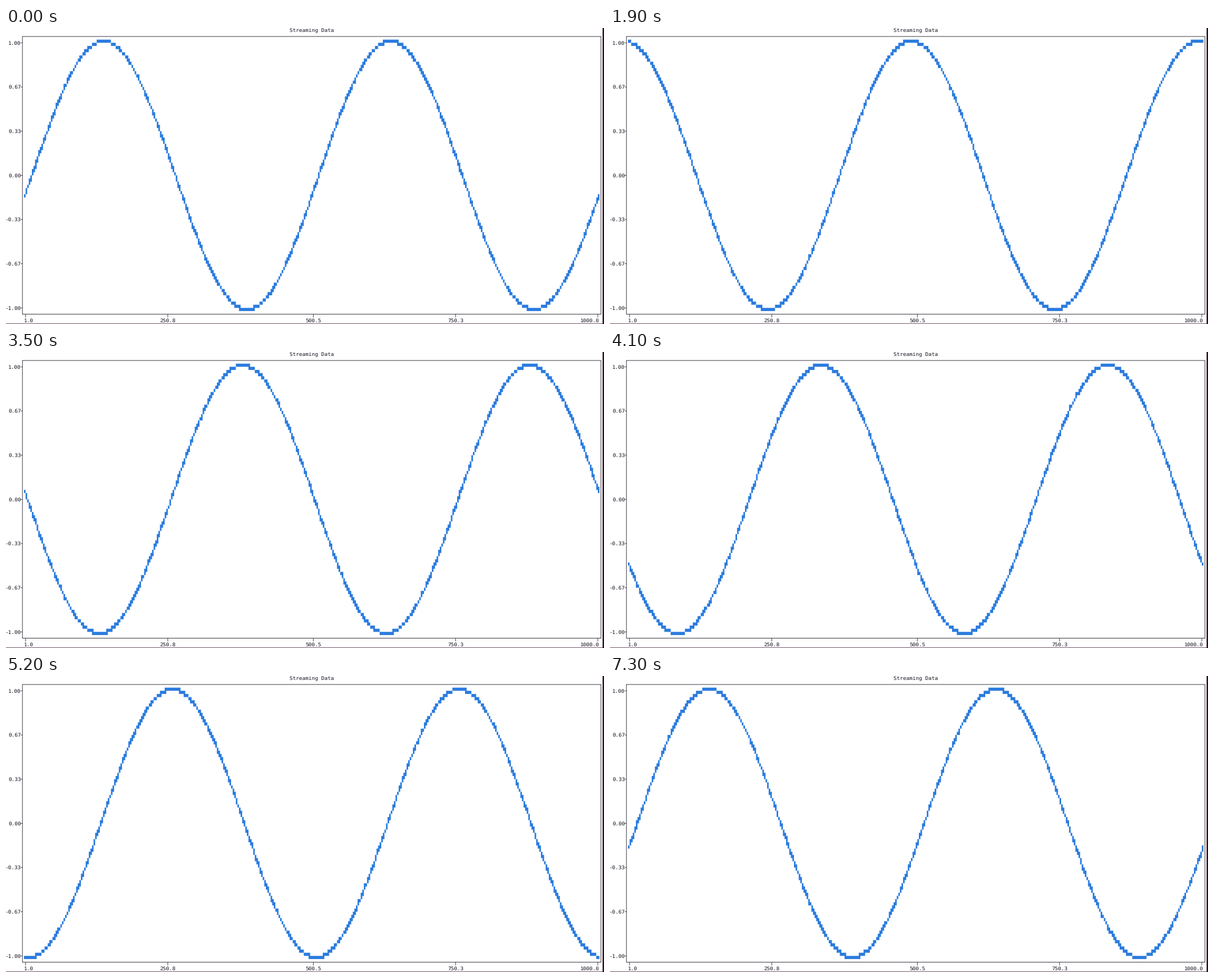
A matplotlib script that plays this animation: 1063 by 527 pixels, repeating every 7.4 s.

```python
import matplotlib.pyplot as plt
import numpy as np
from matplotlib.animation import FuncAnimation
from matplotlib.colors import LinearSegmentedColormap
from matplotlib.patches import Rectangle

plt.rcParams["text.hinting"] = "none"

W, H, DPI = 1063, 527, 128
PX = 72 / DPI                      # one pixel in points
INK, BLUE, EDGE = "#171421", "#2a7bde", "#300a24"

# Terminal character grid: each cell holds 2 x 2 plot dots
CELL_W, CELL_H = 5.62, 11.238
COLS, ROWS = 182, 43
LEFT, TOP = 32.0, 20.7
RIGHT, BOTTOM = LEFT + COLS * CELL_W, TOP + ROWS * CELL_H

POINTS, PHASE_STEPS = 1000, 200
FRAMES, INTERVAL = 74, 100
STALLED = [25, 54, 60, 67, 72]     # frames on which the stream pauses
UPDATE_COUNTS = [0, 10, 27, 40, 51, 60, 68]
PHASES = [-5, 25, 78, 116, 147, 172, 194]

fig = plt.figure(figsize=(W / DPI, H / DPI), dpi=DPI, facecolor="white")
ax = fig.add_axes([0, 0, 1, 1])
ax.axis("off")


def cell_text(col, row, text):
    ax.text(LEFT + col * CELL_W, TOP + row * CELL_H + 9, text, color=INK,
            family="DejaVu Sans Mono", fontsize=CELL_W / 0.602 * PX,
            ha="left", va="baseline")


def line(xs, ys):
    ax.plot(xs, ys, color=INK, lw=0.85 * PX, solid_capstyle="butt",
            solid_joinstyle="miter", snap=False)


def draw_chrome():
    x0, x1 = LEFT - CELL_W / 2, RIGHT + CELL_W / 2
    y0, y1 = TOP - CELL_H / 2, BOTTOM + CELL_H / 2
    line([x0, x1, x1, x0, x0], [y0, y0, y1, y1, y0])

    for i, value in enumerate(np.linspace(1, -1, 7)):
        label = f"{value:.2f}".replace("-0.00", "0.00")
        cell_text(-1 - len(label), 7 * i, label)
        y = TOP + (7 * i + 0.5) * CELL_H
        line([LEFT - CELL_W, x0], [y, y])

    ticks = [(0, 0, "1.0"), (45, 43, "250.8"), (91, 89, "500.5"),
             (136, 134, "750.3"), (181, 176, "1000.0")]
    for tick_col, text_col, label in ticks:
        cell_text(text_col, ROWS + 1, label)
        x = LEFT + (tick_col + 0.5) * CELL_W
        line([x, x], [y1, BOTTOM + CELL_H])

    cell_text(84, -2, "Streaming Data")
    for corner in [(1060.5, 0), (0, 526.3)]:
        ax.add_patch(Rectangle(corner, W, H, color=EDGE, lw=0, snap=False))


def coverage(pixels, start, size, count):
    """Share of each pixel that each of `count` dots covers along one axis."""
    pixel = np.arange(pixels)[:, None]
    near = start + size * np.arange(count)
    overlap = np.minimum(pixel + 1, near + size) - np.maximum(pixel, near)
    return np.clip(overlap, 0, 1)


def to_bins(values, low, high, bins):
    scaled = 0.5 + (bins - 1) * (values - low) / (high - low)
    return np.floor(np.round(scaled, 8)).astype(int)


def wave_image(phase):
    index = np.arange(POINTS)
    y = np.sin(4 * np.pi * index / (POINTS - 1) + 2 * np.pi * phase / PHASE_STEPS)
    dots = np.zeros((2 * ROWS, 2 * COLS))
    dots[2 * ROWS - 1 - to_bins(y, -1, 1, 2 * ROWS),
         to_bins(index, 0, POINTS - 1, 2 * COLS)] = 1
    return ROW_COVER @ dots @ COL_COVER.T


def phase_at(frame):
    updates = frame - sum(s <= frame for s in STALLED)
    return np.rint(np.interp(updates, UPDATE_COUNTS, PHASES))


def update(frame):
    wave.set_data(wave_image(phase_at(frame)))
    return [wave]


ROW_COVER = coverage(H, TOP, CELL_H / 2, 2 * ROWS)
COL_COVER = coverage(W, LEFT, CELL_W / 2, 2 * COLS)

shades = LinearSegmentedColormap.from_list("shades", ["white", BLUE])
wave = ax.imshow(wave_image(phase_at(0)), cmap=shades, vmin=0, vmax=1,
                 interpolation="nearest", aspect="auto", extent=(0, W, H, 0))
draw_chrome()
ax.set_xlim(0, W)
ax.set_ylim(H, 0)

anim = FuncAnimation(fig, update, frames=FRAMES, interval=INTERVAL,
                     repeat=True, repeat_delay=0)
plt.show()
```
